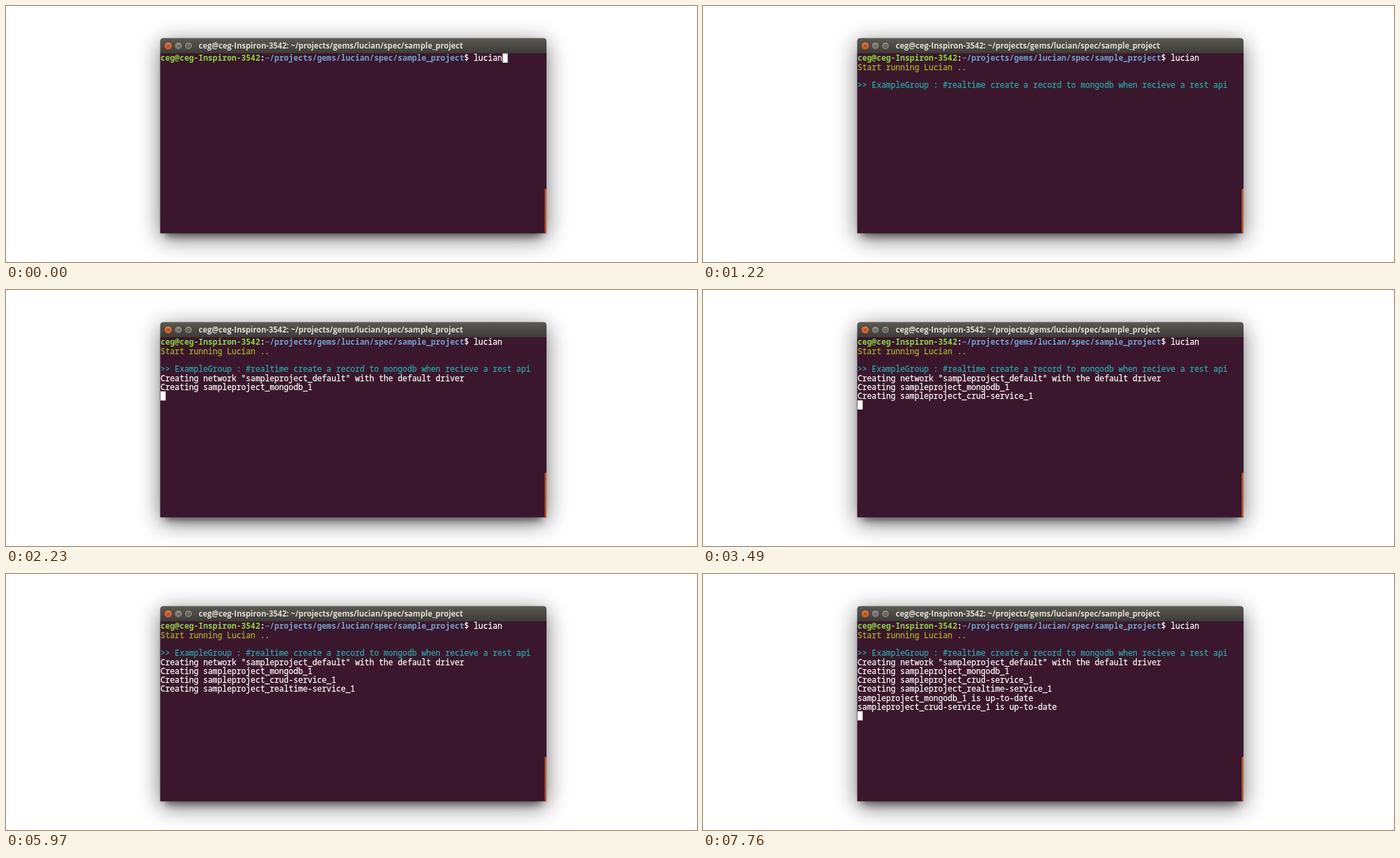
Recreate the animation shown at these times as an HTML page. Size 1024 by 379 pixels, loop 8000 ms.

```html
<!DOCTYPE html>
<html lang="en">
<head>
<meta charset="utf-8">
<title>Terminal session</title>
<style>
  html, body { margin: 0; width: 100%; height: 100%; overflow: hidden; background: #fff; }
  svg { display: block; width: 100%; height: 100%; }
  text { white-space: pre; }
  .title { font: bold 11.54px "Open Sans", "Noto Sans", sans-serif; fill: #dfdbd2; }
  .line { font: 11.733px "Noto Sans Mono", "DejaVu Sans Mono", monospace; }
  .line tspan { color: #f6f6f2; fill: currentColor; stroke: currentColor; stroke-width: .3px; }
  .line .bold { font-weight: bold; stroke: none; }
  .line .user { color: #8cd836; }
  .line .path { color: #729fc8; }
  .line .start { color: #a5ab2b; }
  .line .group { color: #2aa3a1; }
</style>
</head>
<body>
<svg viewBox="0 0 1024 379" xmlns="http://www.w3.org/2000/svg">
  <defs>
    <linearGradient id="bar" x1="0" y1="0" x2="0" y2="1">
      <stop offset="0" stop-color="#595851"/>
      <stop offset="1" stop-color="#3d3c38"/>
    </linearGradient>
    <linearGradient id="orange" x1="0" y1="0" x2="0" y2="1">
      <stop offset="0" stop-color="#e07548"/>
      <stop offset="1" stop-color="#c9572c"/>
    </linearGradient>
    <linearGradient id="grey" x1="0" y1="0" x2="0" y2="1">
      <stop offset="0" stop-color="#908e85"/>
      <stop offset="1" stop-color="#716f68"/>
    </linearGradient>
    <filter id="wide" x="-20%" y="-40%" width="140%" height="180%"><feGaussianBlur stdDeviation="17"/></filter>
    <filter id="near" x="-10%" y="-20%" width="120%" height="140%"><feGaussianBlur stdDeviation="6"/></filter>
  </defs>

  <rect width="1024" height="379" fill="#fff"/>
  <rect x="229" y="55" width="572" height="289" opacity=".55" filter="url(#wide)"/>
  <rect x="236" y="62" width="558" height="279" opacity=".45" filter="url(#near)"/>

  <path d="M228.5 70V52.6q0-5 5-5H796q5 0 5 5V70z" fill="url(#bar)"/>
  <path d="M232 48.3H798" stroke="#6b6a63" opacity=".6"/>
  <rect x="228.5" y="70" width="572.5" height="266.6" fill="#3a172d"/>
  <rect x="798.4" y="270.5" width="2.6" height="66.1" fill="#b8602f"/>

  <g stroke="#33322e" stroke-width=".8">
    <circle cx="240.4" cy="59" r="6" fill="url(#orange)"/>
    <circle cx="255.5" cy="59" r="5.8" fill="url(#grey)"/>
    <circle cx="270.3" cy="59" r="5.8" fill="url(#grey)"/>
    <path d="M238.4 57l4 4m0-4l-4 4M253 59h5M268.3 57.2h4v3.6h-4z" fill="none" opacity=".8"/>
  </g>
  <text class="title" x="285.5" y="63">ceg@ceg-Inspiron-3542: ~/projects/gems/lucian/spec/sample_project</text>

  <g id="screen"></g>
  <rect id="cursor" width="7.6" height="13.5" fill="#fff"/>
</svg>
<script>
  const LOOP = 8000, LEFT = 229, TOP = 70.4, PITCH = 13.28, CELL = 7.04, ASCENT = 11;
  const NS = "http://www.w3.org/2000/svg";
  const screen = document.getElementById("screen");
  const cursor = document.getElementById("cursor");

  // Each line: appearance time, row, then [text, class] runs.
  const lines = [
    [0, 0, ["ceg@ceg-Inspiron-3542", "bold user"], [":", "bold"],
      ["~/projects/gems/lucian/spec/sample_project", "bold path"], ["$ lucian", ""]],
    [1180, 1, ["Start running Lucian ..", "start"]],
    [1220, 3, [">> ExampleGroup : #realtime create a record to mongodb when recieve a rest api", "group"]],
    [1810, 4, ['Creating network "sampleproject_default" with the default driver', ""]],
    [2230, 5, ["Creating sampleproject_mongodb_1", ""]],
    [3490, 6, ["Creating sampleproject_crud-service_1", ""]],
    [5350, 7, ["Creating sampleproject_realtime-service_1", ""]],
    [7470, 8, ["sampleproject_mongodb_1 is up-to-date", ""]],
    [7470, 9, ["sampleproject_crud-service_1 is up-to-date", ""]]
  ];

  // Cursor spans: start, end, row, column.
  const blinks = [
    [0, 140, 0, 72],
    [670, 1180, 1, 0],
    [1850, 2230, 5, 0],
    [2230, 2400, 6, 0],
    [3000, 3490, 6, 0],
    [3490, 3620, 7, 0],
    [4180, 4780, 7, 0],
    [5390, 5970, 8, 0],
    [6600, 7160, 8, 0],
    [7760, LOOP, 10, 0]
  ];

  function add(parent, name, attrs, content = "") {
    const node = document.createElementNS(NS, name);
    for (const key in attrs) node.setAttribute(key, attrs[key]);
    node.textContent = content;
    return parent.appendChild(node);
  }

  const shown = lines.map(([start, row, ...runs]) => {
    const node = add(screen, "text", { class: "line", x: LEFT, y: TOP + ASCENT + row * PITCH });
    runs.forEach(([content, style]) => add(node, "tspan", { class: style }, content));
    return { start, node };
  });

  function draw(t) {
    for (const { start, node } of shown) {
      node.setAttribute("visibility", t >= start ? "visible" : "hidden");
    }
    const span = blinks.find(([from, to]) => t >= from && t < to);
    cursor.setAttribute("visibility", span ? "visible" : "hidden");
    if (span) {
      cursor.setAttribute("x", LEFT + span[3] * CELL);
      cursor.setAttribute("y", TOP + span[2] * PITCH);
    }
  }

  const origin = performance.now();
  function tick() {
    draw((performance.now() - origin) % LOOP);
    requestAnimationFrame(tick);
  }
  tick();
</script>
</body>
</html>
```
